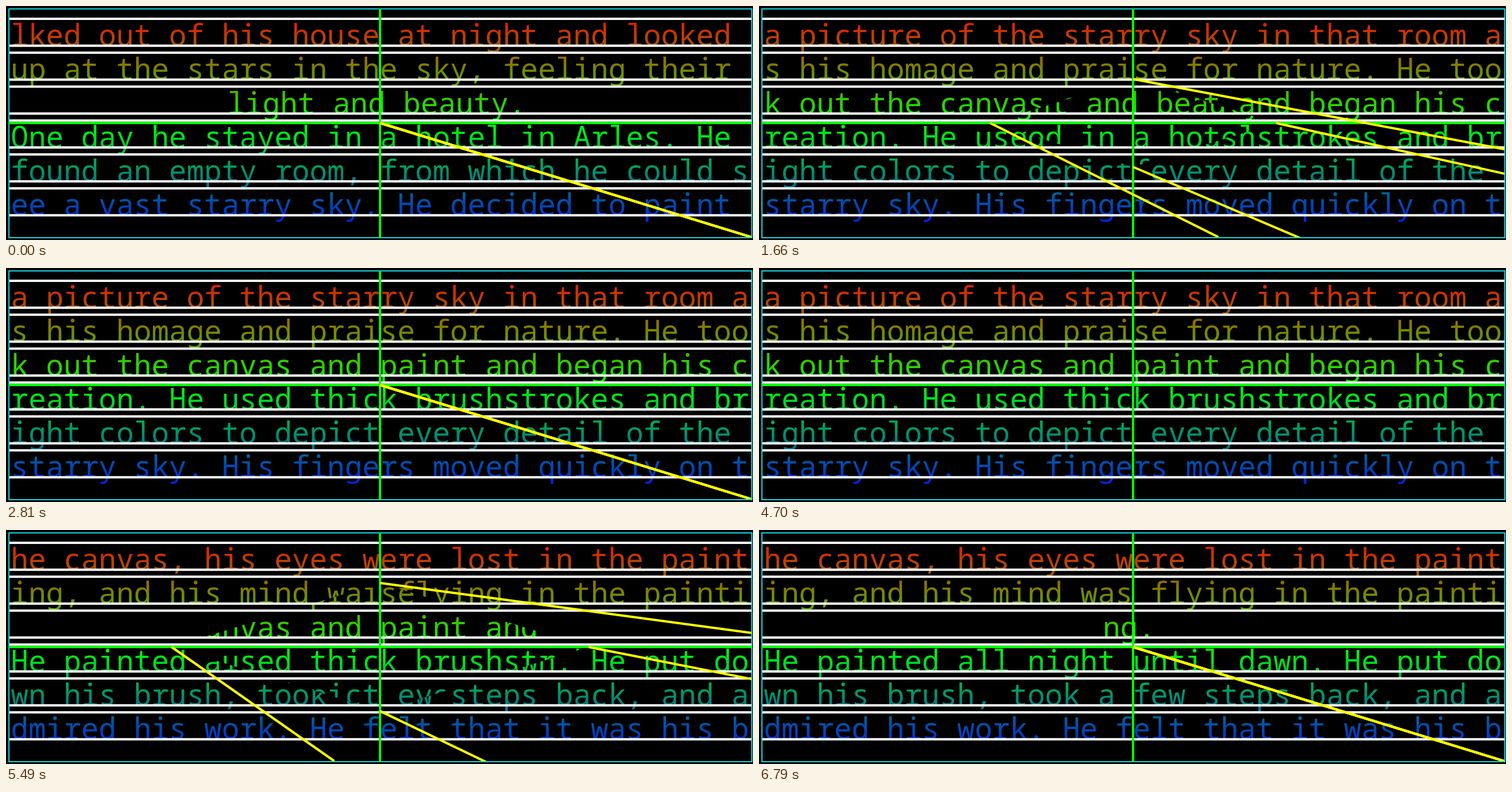
An HTML page with a canvas that plays this animation: 1280 by 402 pixels, repeating every 7890 ms.

```html
<!DOCTYPE html>
<html lang="en">
<head>
<meta charset="utf-8">
<title>Diamond text transition</title>
<style>
html, body { margin: 0; width: 100%; height: 100%; overflow: hidden; background: #000; }
canvas { display: block; }
</style>
</head>
<body>
<canvas id="stage" width="1280" height="402"></canvas>
<script>
const ctx = document.getElementById('stage').getContext('2d');
const LOOP = 7890, DURATION = 1560;
const L = 5, T = 5, HW = 636, HH = 196, CX = L + HW, CY = T + HH;
const ROW = 58.25, TOP = 22, ASCENT = 46.2, LEFT = 8.3;

// A row is a string, or [string, x] where it is not flush left.
const pages = [
  ['lked out of his house at night and looked',
   'up at the stars in the sky, feeling their',
   ['light and beauty.', 379.3],
   'One day he stayed in a hotel in Arles. He',
   'found an empty room, from which he could s',
   'ee a vast starry sky. He decided to paint'],
  ['a picture of the starry sky in that room a',
   's his homage and praise for nature. He too',
   'k out the canvas and paint and began his c',
   'reation. He used thick brushstrokes and br',
   'ight colors to depict every detail of the',
   'starry sky. His fingers moved quickly on t'],
  ['he canvas, his eyes were lost in the paint',
   'ing, and his mind was flying in the painti',
   ['ng.', 589],
   'He painted all night until dawn. He put do',
   'wn his brush, took a few steps back, and a',
   'dmired his work. He felt that it was his b']
];
// reset: the diamond jumps to full size; start: it begins to shrink
const runs = [{ reset: 820, start: 873 }, { reset: 4700, start: 4825 }];

const ink = ctx.createLinearGradient(0, T, 0, T + 2 * HH);
['#f00', '#0f0', '#00f'].forEach((c, i) => ink.addColorStop(i / 2, c));

// cubic-bezier(.25, .1, .25, 1)
function ease(x) {
  if (x <= 0) return 0;
  if (x >= 1) return 1;
  let lo = 0, hi = 1, s;
  for (let i = 0; i < 24; i++) {
    s = (lo + hi) / 2;
    if (.75 * s * (1 - s) + s ** 3 < x) lo = s; else hi = s;
  }
  return .3 * s * (1 - s) ** 2 + 3 * s * s * (1 - s) + s ** 3;
}

function line(x1, y1, x2, y2, color, width) {
  ctx.strokeStyle = color;
  ctx.lineWidth = width;
  ctx.beginPath();
  ctx.moveTo(x1, y1);
  ctx.lineTo(x2, y2);
  ctx.stroke();
}

function drawPage(page) {
  ctx.fillStyle = ink;
  page.forEach((row, i) => {
    const [text, x] = Array.isArray(row) ? row : [row, LEFT];
    ctx.fillText(text, x, TOP + ASCENT + i * ROW);
  });
}

function draw(ms) {
  let index = 0, size = 0;
  runs.forEach((run, i) => {
    if (ms >= run.reset) {
      index = i + 1;
      size = 2 * (1 - ease((ms - run.start) / DURATION));
    }
  });
  const a = HW * size, b = HH * size;
  const tips = [[CX - a, CY], [CX, CY - b], [CX + a, CY], [CX, CY + b]];

  ctx.fillStyle = '#000';
  ctx.fillRect(0, 0, 1280, 402);
  ctx.font = '50.2px "Noto Sans Mono", monospace';
  drawPage(pages[index]);

  // previous page stays inside the shrinking diamond
  if (size > 0) {
    ctx.save();
    ctx.beginPath();
    tips.forEach(p => ctx.lineTo(...p));
    ctx.clip();
    ctx.fillStyle = '#000';
    ctx.fillRect(0, 0, 1280, 402);
    drawPage(pages[index - 1]);
    ctx.restore();
  }

  for (let i = 0; i < 6; i++)
    for (const y of [TOP, TOP + ASCENT])
      line(L, y + i * ROW, 1278, y + i * ROW, '#fff', 4);
  ctx.strokeStyle = '#1ccfdc';
  ctx.lineWidth = 2;
  ctx.strokeRect(L, T, 1273, 393);
  line(L, CY, 1278, CY, '#0f0', 4);
  line(CX, T, CX, 398, '#0f0', 4);

  // each tip casts a ray away from the panel's top left corner
  ctx.save();
  ctx.beginPath();
  ctx.rect(L + 1, T + 1, 1271, 391);
  ctx.clip();
  for (const [x, y] of tips)
    if (x > L && y > T) line(x, y, 2 * x - L, 2 * y - T, '#ff0', 4);
  ctx.restore();
}

function tick() {
  draw(performance.now() % LOOP);
  requestAnimationFrame(tick);
}
tick();
</script>
</body>
</html>
```
